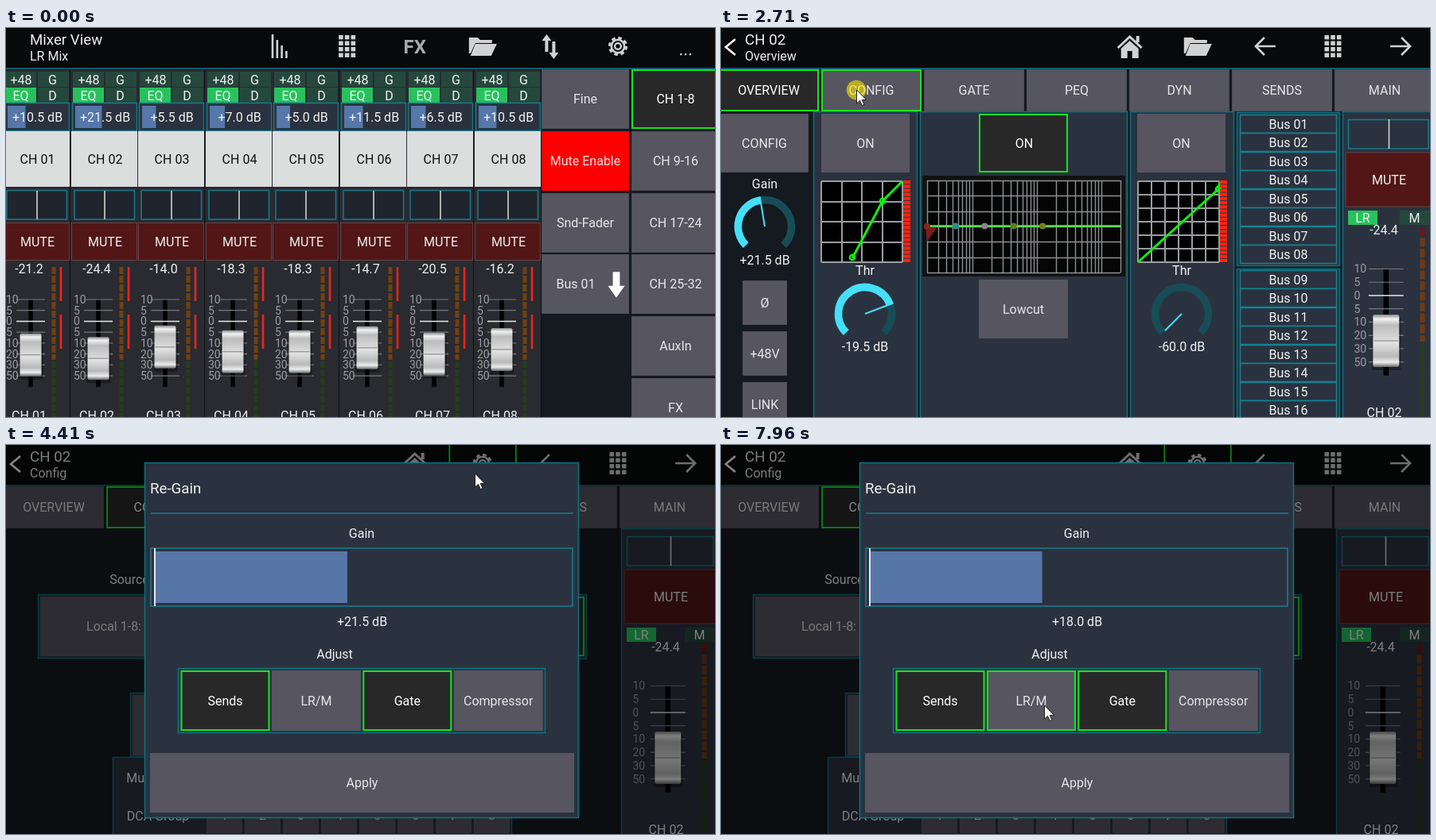
An HTML page for the animation above (8000 ms loop, 891 by 490 pixels).

```html
<!DOCTYPE html>
<html lang="en">
<head>
<meta charset="utf-8">
<title>Mixer remote</title>
<style>
html, body { margin: 0; width: 100%; height: 100%; overflow: hidden; background: #14181f; }
svg { display: block; width: 891px; height: 490px; font-family: Roboto, "Liberation Sans", sans-serif; }
</style>
</head>
<body>
<svg id="stage" viewBox="0 0 891 490" xmlns="http://www.w3.org/2000/svg"></svg>
<script>
const LOOP = 8000;
const TEAL = '#0b7282', GREEN = '#14e61c', GREY = '#565560', PANEL = '#2b323f', BACK = '#151920';
const ICON = '#d2d2d2';
const range = (n, f) => Array.from({ length: n }, (_, i) => f(i)).join('');

// Shape helpers: each returns SVG markup.
const rect = (x, y, w, h, fill, stroke = 'none', sw = 1.5) =>
  `<rect x="${x}" y="${y}" width="${w}" height="${h}" fill="${fill}" stroke="${stroke}" stroke-width="${sw}"/>`;
const box = (x1, y1, x2, y2, fill, stroke, sw) => rect(x1, y1, x2 - x1, y2 - y1, fill, stroke, sw);
const line = (x1, y1, x2, y2, color, w = 1.5, extra = '') =>
  `<path d="M${x1} ${y1}L${x2} ${y2}" stroke="${color}" stroke-width="${w}" fill="none" ${extra}/>`;
const path = (d, fill = ICON, extra = '') => `<path d="${d}" fill="${fill}" ${extra}/>`;
const dot = (x, y, r, fill, extra = '') => `<circle cx="${x}" cy="${y}" r="${r}" fill="${fill}" ${extra}/>`;
const ring = (r, w, extra = '') => dot(0, 0, r, 'none', `stroke="${ICON}" stroke-width="${w}" ${extra}`);
const at = (x, y, s) => `<g transform="translate(${x} ${y})">${s}</g>`;
const text = (s, x, y, { size = 16, fill = '#f0f0f0', anchor = 'middle', extra = '' } = {}) =>
  `<text x="${x}" y="${Math.round(y + size * 0.355)}" font-size="${size}" fill="${fill}" text-anchor="${anchor}" ${extra}>${s}</text>`;
const panel = (x1, y1, x2, y2, fill = PANEL) => box(x1 + .5, y1 + .5, x2 - .5, y2 - .5, fill, TEAL);

function button(x1, y1, x2, y2, label, { on = false, fill = GREY, tx = (x1 + x2) / 2 } = {}) {
  const face = on ? box(x1 + 1, y1 + 1, x2 - 1, y2 - 1, '#282828', GREEN, 2)
    : fill !== GREY ? box(x1, y1, x2, y2, fill)
    : box(x1 + .5, y1 + .5, x2 - .5, y2 - .5, fill, 'rgba(110,110,120,.45)', 1);
  return face + text(label, tx, (y1 + y2) / 2, { fill: on ? '#fff' : '#e6e6e8' });
}

const downArrow = (x, y, k = 1) =>
  path(`M${x - 5 * k} ${y - 18 * k}h${10 * k}v${20 * k}h${7 * k}l${-12 * k} ${17 * k}l${-12 * k} ${-17 * k}h${7 * k}z`, '#fff');

// Header icons, drawn around their own centre.
const icons = {
  bars: range(4, i => line(-8.5 + i * 5.8, [-15, -8, -1, 6][i], -8.5 + i * 5.8, 15, ICON, 2.6)),
  keypad: range(12, i => rect(-10.5 + i % 3 * 7.7, -14 + Math.floor(i / 3) * 7.5, 5.6, 5.4, ICON)),
  fx: text('FX', 0, 0, { size: 24, fill: '#a9a9a9', extra: 'font-weight="700"' }),
  folder: path('M-17-11h11l3 3h15v4h-21l-6 13h-2z') + path('M-9-3h27l-7 15h-26z'),
  updown: path('M-4.5-15l6 8h-4v14h-4v-14h-4z') + path('M4.5 16l-6-8h4v-14h4v14h4z'),
  gear: ring(10.6, 3, 'stroke-dasharray="4.6 3.72"') + ring(8.2, 2.6) + ring(3.9, 2.4),
  home: path('M-16 1L0-14L16 1l-2 2L0-10L-14 3z') + path('M-11 3L0-7L11 3V15H3V6H-3V15H-11z') + rect(8, -13, 4, 8, ICON),
  left: path('M13 0H-11M-1-11L-12 0L-1 11', 'none', `stroke="${ICON}" stroke-width="2.6"`),
  right: path('M-13 0H11M1-11L12 0L1 11', 'none', `stroke="${ICON}" stroke-width="2.6"`),
  more: range(3, i => rect(-7 + i * 5.8, 9, 2.3, 2.3, ICON)),
};

const header = (title, sub, names, first, back) =>
  rect(0, 0, 891, 50, '#08090a') + line(0, 51, 891, 51, TEAL) +
  (back ? path('M18 14L6 24L18 34', 'none', 'stroke="#fff" stroke-width="2.6"') : '') +
  text(title, 30, 14, { size: 18.7, anchor: 'start' }) + text(sub, 30, 35, { anchor: 'start' }) +
  names.map((n, i) => at(first + i * 85.1, 23, icons[n])).join('');

// Fader with scale; k = 1 is the small mixer size.
function fader(cx, top, k, db, labelX) {
  const step = 13.72 * k, y = i => top + i * step;
  const marks = [10, 5, 0, 5, 10, 20, 30, 50];
  const mid = y(4) + (-10 - db) * step / 10 - .5, w = 27 * k, h = 54 * k, x = cx - w / 2, t = mid - h / 2;
  return box(cx - 2.7 * k, top, cx + 2.7 * k, top + 110 * k, '#000') +
    marks.map((m, i) => line(cx - 18 * k, y(i), cx + 18 * k, y(i), i === 2 ? '#e8e8e8' : '#777a80', i % 3 === 2 ? 1.6 : 1.2) +
      text(m, labelX, y(i), { size: 14, fill: '#9a9ca0', anchor: 'start' })).join('') +
    box(x - 1, t + 4, x + w + 2, t + h + 4, 'rgba(0,0,0,.35)') +
    `<rect x="${x}" y="${t}" width="${w}" height="${h}" rx="2" fill="url(#silver)"/>` +
    line(x + 1, mid, x + w - 1, mid, '#8f8f8f', 1.2);
}

// Rotary dial over a 270 degree sweep; v runs from 0 to 1.
function dial(cx, cy, v, color = '#45dffa') {
  const p = (f, r) => {
    const a = (f * 270 - 225) * Math.PI / 180;
    return `${(cx + r * Math.cos(a)).toFixed(1)} ${(cy + r * Math.sin(a)).toFixed(1)}`;
  };
  const arc = (f, c) => path(`M${p(0, 33.5)}A33.5 33.5 0 ${f > 2 / 3 ? 1 : 0} 1 ${p(f, 33.5)}`, 'none', `stroke="${c}" stroke-width="9.5"`);
  return arc(1, '#184c57') + (v ? arc(v, color) : '') +
    path(`M${cx} ${cy}L${p(v, v ? 38 : 30)}`, 'none', `stroke="${color}" stroke-width="2"`);
}

function channel(i) {
  const gain = [10.5, 21.5, 5.5, 7, 5, 11.5, 6.5, 10.5][i];
  const level = [-21.2, -24.4, -14, -18.3, -18.3, -14.7, -20.5, -16.2][i];
  const name = 'CH 0' + (i + 1), dark = '#25483c';
  return at(Math.round(i * 84.5), 0,
    box(-4, 53, 81, 490, '#292b31') + line(80.5, 53, 80.5, 490, '#0d0f13', 1) +
    box(-1, 55, 38, 74, dark) + box(40, 55, 79, 74, dark) + box(-1, 75, 38, 94, '#27c25d') + box(40, 75, 79, 94, dark) +
    text('+48', 19, 65) + text('G', 58.5, 65) + text('EQ', 18.5, 85) + text('D', 58.5, 85) +
    box(-1.5, 94.5, 79.5, 129.5, PANEL, '#177b8c') + box(2, 98, 2 + gain + 12, 126, '#5577a9') +
    text(`+${gain.toFixed(1)} dB`, 39.5, 112) +
    box(-3, 130, 80, 200, '#dcdddd') + text(name, 39.5, 165, { fill: '#101010' }) +
    box(1, 204.5, 76.5, 241, '#20242c', '#177b8c') + line(39, 205, 39, 241, '#ddd') +
    box(-2.5, 245.5, 79.5, 292.5, '#521617', '#6a4044', 1) + text('MUTE', 39.5, 269) +
    text(level.toFixed(1), 29, 303) +
    line(60, 301, 60, 418, '#70400f', 5, 'stroke-dasharray="9 2"') + line(60, 419, 60, 490, '#263c1b', 5, 'stroke-dasharray="9 2"') +
    line(69, 301, 69, 344, '#f3221a', 2.6) + line(69, 361, 69, 404, '#f3221a', 2.6) +
    fader(31, 342, 1, level, 0) + text(name, 29, 488));
}

function mixerScene() {
  const banks = ['CH 1-8', 'CH 9-16', 'CH 17-24', 'CH 25-32', 'AuxIn', 'FX'];
  const top = i => Math.floor(52.6 + i * 77.7);
  return rect(0, 0, 891, 490, BACK) +
    header('Mixer View', 'LR Mix', ['bars', 'keypad', 'fx', 'folder', 'updown', 'gear', 'more'], 343.5) + range(8, channel) +
    ['Fine', 'Mute Enable', 'Snd-Fader', 'Bus 01'].map((s, i) => button(673, top(i), 783, top(i) + 75, s,
      { fill: i === 1 ? '#fe0000' : GREY, tx: i === 3 ? 716 : 728 })).join('') + downArrow(767, 323, .88) +
    banks.map((s, i) => button(786, top(i), 897, top(i) + 75, s, { on: !i })).join('');
}

const tabNames = ['OVERVIEW', 'CONFIG', 'GATE', 'PEQ', 'DYN', 'SENDS', 'MAIN'];
const tabs = active => tabNames.map((s, i) => button(-3 + i * 129, 52, 123 + i * 129, 105, s, { on: i === active })).join('');

// Channel strip at the right edge.
function strip(x) {
  const c = x / 2 + 449;
  const meter = (y1, y2, color) => line(c + 42, y1, c + 42, y2, color, 6, 'stroke-dasharray="11 2.6"');
  return panel(x, 105, 900, 500) +
    box(x + 7.5, 115.5, 889, 152, PANEL, '#177b8c') + line(c, 115, c, 152, '#ddd') +
    box(x + 4, 157, 897, 225, '#521617', '#6a4044', 1) + text('MUTE', c, 191) +
    box(x + 7, 230, x + 44, 248, '#27c25d') + text('LR', x + 25.5, 239) + box(853, 230, 890, 248, '#25483c') + text('M', 871.5, 239) +
    text('-24.4', c - 6.5, 254) +
    meter(251, 262, '#6b1713') + meter(264.6, 395, '#6e3b12') + meter(397, 490, '#283c1e') +
    fader(c - 3.7, 303.5, 1.22, -24.4, c - 48 + (x > 780 ? 4 : 0)) + text('CH 02', c - 6, 484);
}

// Square dynamics graph with its red meter.
function graph(x, cells, curve, marks) {
  const grid = range(cells + 1, i => {
    const d = Math.round(i * 102 / cells);
    return line(x + d, 193, x + d, 295, '#999ea0', 2) + line(x, 193 + d, x + 102, 193 + d, '#999ea0', 2);
  });
  return box(x, 193, x + 102, 295, '#000') + grid +
    path(curve, 'none', 'stroke="#0cf00c" stroke-width="3"') +
    marks.map(([a, b]) => dot(a, b, 3.2, 'none', 'stroke="#0cf00c" stroke-width="2.4"')).join('') +
    line(x + 107.5, 192, x + 107.5, 296, '#fb2412', 9, 'stroke-dasharray="4.2 1"');
}

function eqGraph() {
  const freqs = [2, 3, 4, 5, 6, 7, 8, 9].map(f => f * 10);
  for (let d = 100; d <= 10000; d *= 10) for (let f = 1; f < 10 && f * d <= 20000; f++) freqs.push(f * d);
  const spots = ['#2b8e88', '#8b7f92', '#5f7d1c', '#7c7c14'];
  return box(253, 186, 508, 313, '#111') + box(259, 192, 502, 308, '#050505') +
    freqs.map(f => Math.round(259 + 81 * Math.log10(f / 20)) + .5).map(x => line(x, 192, x, 308, '#8c9092', 1.4)).join('') +
    range(7, i => { const y = Math.round(192 + i * 19.3) + .5; return line(259, y, 502, y, '#8c9092', 1.4); }) +
    path('M257 250h15l-13 19z', '#7d1d1b') + line(259, 249.5, 502, 249.5, '#52e84c', 2.4) +
    dot(259, 250, 4, '#8d241c') + spots.map((c, i) => dot(295 + i * 36.4, 249.5, 4, c)).join('');
}

function overviewScene() {
  const buses = range(16, i => {
    const y = Math.floor(121 + i * 23.5 + (i > 7 ? 8 : 0));
    return box(652.5, y - 11.5, 773.5, y + 11.5, PANEL, '#138394') + text('Bus ' + String(i + 1).padStart(2, '0'), 713, y);
  });
  return rect(0, 0, 891, 490, BACK) +
    header('CH 02', 'Overview', ['home', 'folder', 'left', 'keypad', 'right'], 513.7, true) + tabs(0) +
    button(-1, 108, 110, 182, 'CONFIG') + text('Gain', 55, 196) + dial(55, 250, 33.5 / 72) + text('+21.5 dB', 55, 292) +
    ['Ø', '+48V', 'LINK'].map((s, i) => button(27, 318 + i * 64, 83, 374 + i * 64, s)).join('') +
    panel(116, 105, 247, 500) + button(126, 108, 237, 182, 'ON') +
    graph(126, 4, 'M165 290L203 218L228 193', [[165, 289], [203, 218]]) +
    text('Thr', 181, 305) + dial(181, 360, 60.5 / 80) + text('-19.5 dB', 181, 401) +
    panel(250, 105, 511, 500) + button(324, 108, 436, 182, 'ON', { on: true, tx: 381 }) + eqGraph() + button(324, 317, 436, 391, 'Lowcut') +
    panel(514, 105, 645, 500) + button(523, 108, 634, 182, 'ON') +
    graph(524, 6, 'M524 295L625 203L627 193', [[625, 203]]) +
    text('Thr', 579, 305) + dial(579, 360, 0) + text('-60.0 dB', 579, 401) +
    panel(648, 106, 778, 300) + panel(648, 303, 778, 500) + buses + strip(781);
}

function configScene() {
  const group = (n, y) => range(n, i => button(252 + i * 48, y, 297 + i * 48, y + 45, i + 1));
  return rect(0, 0, 891, 490, BACK) +
    header('CH 02', 'Config', ['home', 'gear', 'left', 'keypad', 'right'], 513.7, true) + tabs(1) +
    text('Source', 155, 169) + panel(40, 188, 269, 269) + button(43, 191, 267, 266, 'Local 1-8: 2', { tx: 142 }) + downArrow(247, 229) +
    panel(304, 108, 423, 312) + button(307, 110, 420, 186, 'Lowcut') + dial(363.5, 248.5, 0, '#b4f7c3') + text('20 Hz', 364, 290) +
    panel(458, 130, 576, 290) + button(461, 133, 574, 209, 'Delay') + button(461, 211, 574, 287, '0.3 ms') +
    text('Dynamics', 671, 169) + panel(611, 188, 730, 270) + button(615, 191, 727, 266, 'Pre EQ', { on: true }) +
    panel(156, 312, 614, 393) + button(159, 315, 271, 391, 'Insert') + button(274, 315, 386, 391, 'Pre', { tx: 319 }) +
    downArrow(370, 353, .9) + button(388, 315, 611, 391, 'OFF', { tx: 486 }) + downArrow(592, 352.5) +
    panel(134, 393, 636, 500) + text('Mute Group', 193, 419) + group(6, 396) + text('DCA Group', 191, 467) + group(8, 444) + strip(773);
}

const choices = ['Sends', 'LR/M', 'Gate', 'Compressor'];
const choiceBox = i => [219.5 + i * 114.4, 284, 331.5 + i * 114.4, 360];
const dialog = () =>
  panel(174, 22, 720, 470) + text('Re-Gain', 181, 54, { size: 18.7, anchor: 'start' }) + line(182, 86, 713, 86, '#0f7f90') +
  text('Gain', 447, 111) + box(182, 130, 712, 203, PANEL, '#177f90') +
  '<rect id="bar" x="187" y="134" height="65" fill="#5776a8"/>' + line(187, 130, 187, 203, '#e8e8e8', 2) +
  '<text id="gain" x="447.5" y="228" font-size="16" fill="#f0f0f0" text-anchor="middle"></text>' +
  text('Adjust', 413, 263) + panel(216, 281, 678, 363) +
  choices.map((s, i) => button(...choiceBox(i), s, { on: i % 2 === 0 })).join('') + button(181, 388, 714, 463, 'Apply');

const frame = id => `<rect id="${id}" fill="none" stroke="${GREEN}" stroke-width="2"/>`;
document.getElementById('stage').innerHTML =
  `<defs><linearGradient id="silver" x2="0" y2="1">
    <stop stop-color="#8a8a8a"/><stop offset=".08" stop-color="#f2f2f2"/><stop offset=".2" stop-color="#bcbcbc"/>
    <stop offset=".46" stop-color="#d8d8d8"/><stop offset=".54" stop-color="#e2e2e2"/><stop offset=".8" stop-color="#b9b9b9"/>
    <stop offset=".91" stop-color="#ededed"/><stop offset="1" stop-color="#666"/></linearGradient></defs>
  <g id="mixer">${mixerScene()}</g><g id="overview">${overviewScene()}</g><g id="config">${configScene()}</g>
  ${frame('hover')}
  <g id="modal">${rect(0, 0, 891, 490, 'rgba(0,0,0,.48)')}${dialog()}${frame('choice')}</g>
  <g id="pointer"><circle id="press" r="12.3" fill="#ffee00" opacity=".58"/>
  <path d="M.5 0V17L4.5 13.4L7.3 19.6L9.9 18.5L7.2 12.4H12.5Z" fill="#fff" stroke="#111" stroke-width=".9"/></g>`;
const el = id => document.getElementById(id);
const show = (id, on) => el(id).setAttribute('display', on ? 'inline' : 'none');
const set = (id, attrs) => Object.entries(attrs).forEach(([k, v]) => el(id).setAttribute(k, v));

// Pointer moves: first and last step time, step count, destination.
const START = [686, 497];
const moves = [
  [300, 990, 10, 116, 160], [2020, 2330, 5, 170, 78], [3420, 4030, 9, 589, 36],
  [4890, 5660, 11, 445, 167], [6580, 7190, 9, 402, 151], [7500, 7960, 7, 406, 328],
];
const presses = [[1310, 1390], [2710, 2790], [4260, 4340], [6500, 7270]];
const OPEN = 4410;

function pointerAt(t) {
  let [x, y] = START;
  for (const [from, to, steps, x1, y1] of moves) {
    if (t < from) break;
    const p = Math.min(1, (Math.floor((t - from) * (steps - 1) / (to - from) + 1e-6) + 1) / steps);
    const e = p * p * (3 - 2 * p);
    x += (x1 - x) * e;
    y += (y1 - y) * e;
  }
  return [x, y];
}

const hotspots = [
  ...tabNames.map((_, i) => [-3 + i * 129, 52, 123 + i * 129, 105]),
  ...[0, 1, 2, 3, 4].map(i => [471 + i * 85.3, -2, 556.5 + i * 85.3, 50]),
];

function highlight(id, spots, [x, y]) {
  const hit = spots.find(s => x >= s[0] && x <= s[2] && y >= s[1] && y <= s[3]);
  show(id, hit);
  if (hit) set(id, { x: hit[0] + 1, y: hit[1] + 1, width: hit[2] - hit[0] - 2, height: hit[3] - hit[1] - 2 });
}

function render(t) {
  const pos = pointerAt(t);
  show('mixer', t < 1470);
  show('overview', t >= 1470 && t < 2870);
  show('config', t >= 2870);
  show('modal', t >= OPEN);
  highlight('hover', t < 1470 ? [] : hotspots, pointerAt(Math.min(t, OPEN)));
  highlight('choice', choices.map((_, i) => choiceBox(i)), t < OPEN ? START : pos);

  // The bar follows the pointer once dragged below its value, in 0.5 dB steps.
  const dragX = t < 6580 ? 445 : pointerAt(Math.min(t, 7270))[0];
  const gain = Math.min(21.5, Math.round((dragX - 187) / 7.22 * 2) / 2 - 12);
  set('bar', { width: (gain + 12) * 7.22 });
  el('gain').textContent = `+${gain.toFixed(1)} dB`;

  show('pointer', t >= 300);
  show('press', presses.some(([a, b]) => t >= a && t < b));
  set('pointer', { transform: `translate(${pos[0].toFixed(1)} ${pos[1].toFixed(1)})` });
}

const began = performance.now();
function tick() {
  render((performance.now() - began) % LOOP);
  requestAnimationFrame(tick);
}
tick();
</script>
</body>
</html>
```
